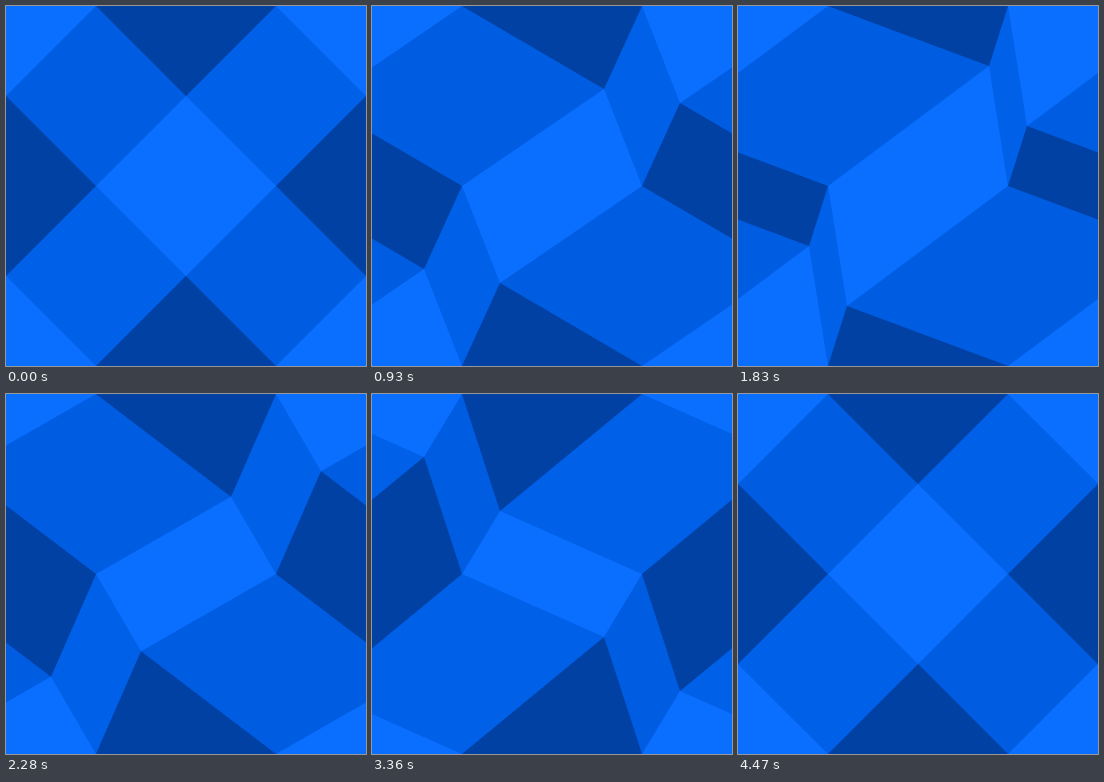
Write an HTML page with a canvas that moves like this. It is 360 px wide and 360 px high and loops after 4500 ms.

```html
<!DOCTYPE html>
<html lang="en">
<head>
<meta charset="utf-8">
<title>Shifting tiles</title>
<style>
  html, body { margin: 0; width: 100%; height: 100%; overflow: hidden; background: #005ce1; }
  canvas { display: block; width: 100vw; height: 100vh; }
</style>
</head>
<body>
<canvas id="stage" width="360" height="360"></canvas>
<script>
const ctx = document.getElementById('stage').getContext('2d');
const LOOP = 4500;
const COLORS = { light: '#0a6fff', midA: '#005ce1', midB: '#0060e8', dark: '#0041a3' };

// Path of the moving vertex: time, x offset, y offset
const KEYS = [
  [0, 0, 0], [930, 52, -7], [1830, 71, -30], [2670, 12, 46],
  [3360, -52, 27], [3840, -24, 22], [LOOP, 0, 0]
];

// Velocity at a key, at rest where the loop closes
function velocity(i, axis) {
  if (i === 0 || i === KEYS.length - 1) return 0;
  const [a, b, c] = [KEYS[i - 1], KEYS[i], KEYS[i + 1]];
  const before = b[0] - a[0], after = c[0] - b[0];
  const vIn = (b[axis] - a[axis]) / before, vOut = (c[axis] - b[axis]) / after;
  return (vIn * after + vOut * before) / (before + after);
}

function offset(time, axis) {
  const i = KEYS.findIndex(key => key[0] > time) - 1;
  const a = KEYS[i], b = KEYS[i + 1], span = b[0] - a[0];
  const u = (time - a[0]) / span, w = 1 - u;
  return a[axis] * w * w * (1 + 2 * u) + b[axis] * u * u * (3 - 2 * u)
    + span * u * w * (velocity(i, axis) * w - velocity(i + 1, axis) * u);
}

// Repeats one quadrilateral over the diagonal lattice
function tile(color, points, overlap) {
  ctx.beginPath();
  for (let i = -2; i <= 2; i++) {
    for (let j = -2; j <= 2; j++) {
      points.forEach(([x, y], n) =>
        ctx[n ? 'lineTo' : 'moveTo'](x + 180 * (i + j), y + 180 * (i - j)));
      ctx.closePath();
    }
  }
  ctx.fillStyle = ctx.strokeStyle = color;
  ctx.fill();
  if (overlap) ctx.stroke();
}

function draw(time) {
  const dx = offset(time, 1), dy = offset(time, 2);
  const top = [180 + dx, 90 + dy], bottomY = 270 - dy;
  ctx.lineJoin = 'round';
  // Middle tones overlap slightly so no seams show
  tile(COLORS.midA, [[90, 0], top, [90, 180], [-dx, bottomY - 180]], true);
  tile(COLORS.midB, [[270, 0], top, [270, 180], [360 - dx, bottomY - 180]], true);
  tile(COLORS.dark, [[90, 0], top, [270, 0], [180 - dx, bottomY - 360]]);
  tile(COLORS.light, [[90, 180], top, [270, 180], [180 - dx, bottomY]]);
}

const start = performance.now();
function frame() {
  draw((performance.now() - start) % LOOP);
  requestAnimationFrame(frame);
}
frame();
</script>
</body>
</html>
```
